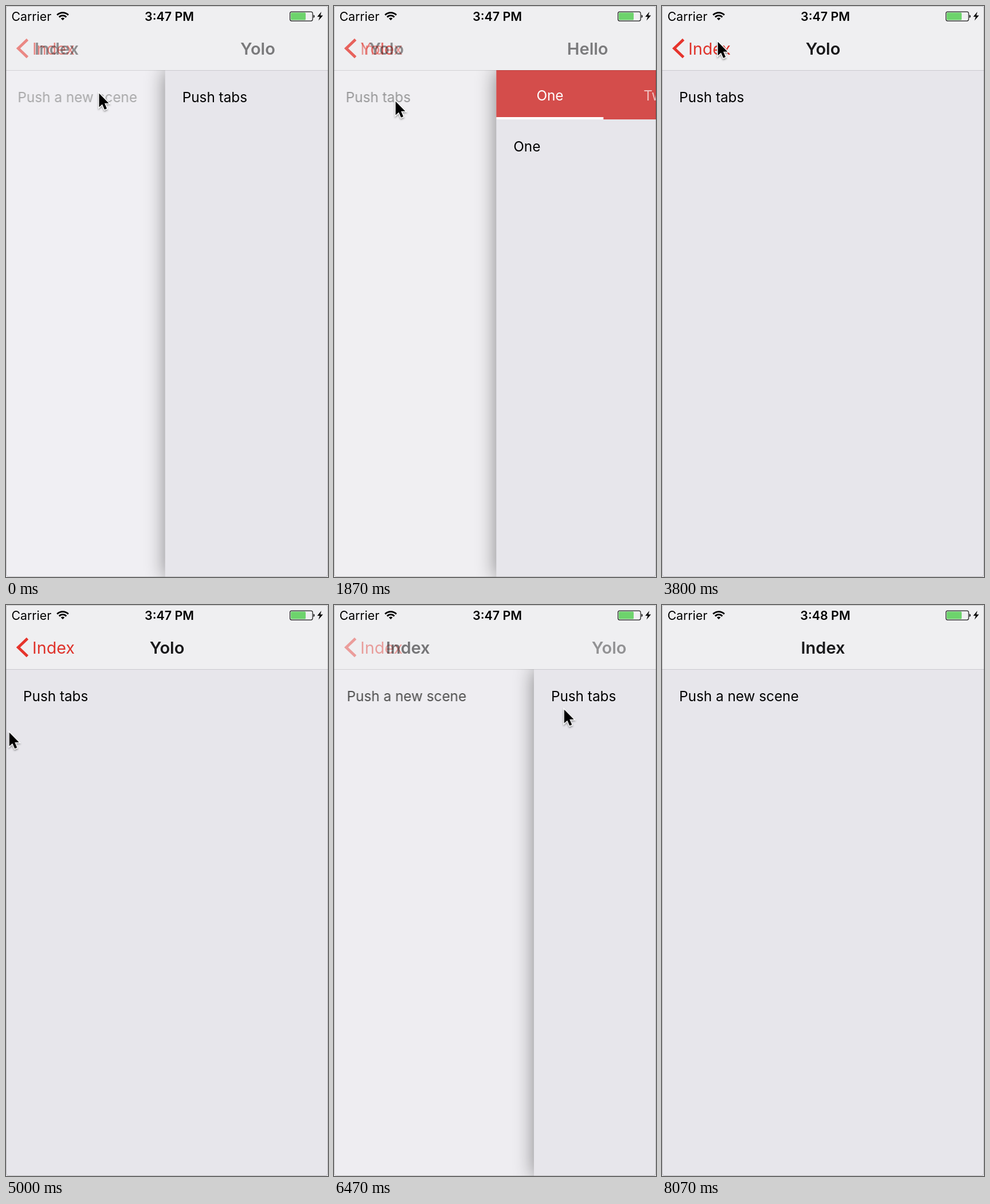
Write an HTML page that moves like this. It is 562 px wide and 997 px high and loops after 8140 ms.

```html
<!DOCTYPE html>
<html lang="en">
<head>
<meta charset="utf-8">
<title>Navigation demo</title>
<style>
/* --a: how far the Yolo card is off screen, --b: the same for the Hello card */
@property --a { syntax: "<number>"; inherits: true; initial-value: 1; }
@property --b { syntax: "<number>"; inherits: true; initial-value: 1; }

html, body { margin: 0; width: 100%; height: 100%; overflow: hidden; background: #fff; }

.stage {
  position: absolute; left: 0; top: 0; width: 562px; height: 997px;
  overflow: hidden; background: #fff; color: #000;
  font: 24.3px/40px Inter, "Open Sans", sans-serif;
  animation: slide-a 8140ms infinite linear, slide-b 8140ms infinite ease-in-out;
}
.stage * { position: absolute; box-sizing: border-box; white-space: nowrap; }
svg * { position: static; }

.cards { left: 0; top: 112px; width: 562px; height: 885px; overflow: hidden; }
.card {
  inset: 0; background: #e7e6eb;
  box-shadow: 0 0 32px rgba(0, 0, 0, .45);
}
.card > .text { left: 30px; top: 27px; }
.index.card {
  opacity: calc(.3 + .7 * var(--a) - .7 * (1 - var(--b)));
  transform: translateX(calc((var(--a) + var(--b) - 2) * 17.6px));
}
.yolo.card {
  opacity: calc(.3 + .7 * var(--b));
  transform: translateX(calc(var(--a) * 615px - (1 - var(--b)) * 17.6px));
}
.hello.card { transform: translateX(calc(var(--b) * 615px)); }
.hello.card > .text { top: 113px; }

.tabs { left: 0; top: 0; width: 100%; height: 86px; background: #d44d4b; color: #fff; }
.tabs span { top: 24px; width: 33.333%; text-align: center; opacity: .65; }
.tabs span:nth-child(1) { left: 0; opacity: 1; }
.tabs span:nth-child(2) { left: 33.333%; }
.tabs span:nth-child(3) { left: 66.667%; }
.tabs i { left: 0; bottom: 0; width: 187px; height: 4px; background: #fff; }

.bar { left: 0; top: 0; width: 562px; height: 112px; background: #efeff1; }
.line { left: 0; top: 112px; width: 562px; height: 1px; background: rgba(0, 0, 0, .12); }

.title {
  left: 0; top: 55px; width: 562px; text-align: center;
  font-size: 29px; font-weight: 600; color: #19191b;
}
.index.title { opacity: var(--a); transform: translateX(calc((var(--a) - 1) * 351px)); }
.yolo.title {
  opacity: calc((1 - var(--a)) * var(--b));
  transform: translateX(calc((var(--a) + var(--b) - 1) * 351px));
}
.hello.title { opacity: calc(1 - var(--b)); transform: translateX(calc(var(--b) * 351px)); }

.back { left: 0; top: 55px; width: 200px; height: 40px; font-size: 28.7px; color: #df332b; }
.back span { left: 46px; top: 0; }
.back svg { left: 16px; top: 0; width: 26px; height: 40px; }
.back path { fill: none; stroke: #e6342c; stroke-width: 4.8; }
.yolo.back { opacity: calc((1 - var(--a)) * var(--b)); }
.hello.back { opacity: calc(1 - var(--b)); }
.hit { inset: 0; }

.carrier { left: 9.5px; top: -2px; font-size: 21.3px; }
.clock { left: 0; top: -2px; width: 570px; text-align: center; font-size: 21.4px; font-weight: 600; }
.icons { left: 0; top: 0; width: 562px; height: 40px; }
.frame {
  inset: 0; border-radius: 3px 3px 5px 5px;
  box-shadow: inset 0 0 0 1px rgba(0, 0, 0, .19);
}
.cursor {
  left: 0; top: 0; width: 30px; height: 40px; overflow: visible;
  filter: drop-shadow(0 2px 1.5px rgba(0, 0, 0, .35));
  animation: point 8140ms infinite linear, leave 8140ms infinite step-end;
}

.first-tap { animation: first-tap 8140ms infinite linear; }
.tabs-tap { animation: tabs-tap 8140ms infinite linear; }
.back-tap { animation: back-tap 8140ms infinite linear; }
.before { animation: before 8140ms infinite step-end; }
.after { animation: after 8140ms infinite step-end; }

@keyframes slide-a {
  0% { --a: .458; animation-timing-function: ease-out; }
  1.47%, 61.9% { --a: 0; }
  67.94%, 70.39% { --a: .3; }
  74.57% { --a: .396; }
  79.48% { --a: .567; }
  81.08% { --a: .6; animation-timing-function: ease-out; }
  84.15%, 100% { --a: 1; }
}
@keyframes slide-b {
  0%, 21.38% { --b: 1; }
  24.45%, 42.75% { --b: 0; }
  45.82%, 100% { --b: 1; }
}
@keyframes first-tap {
  0% { opacity: .5; }
  1.6%, 100% { opacity: 1; }
}
@keyframes tabs-tap {
  0%, 19.66% { opacity: 1; }
  20.76%, 21.38% { opacity: .2; }
  24.45%, 100% { opacity: 1; }
}
@keyframes back-tap {
  0%, 41.15% { opacity: 1; }
  42.26%, 42.75% { opacity: .2; }
  45.82%, 100% { opacity: 1; }
}
@keyframes before {
  0% { visibility: visible; }
  86%, 100% { visibility: hidden; }
}
@keyframes after {
  0% { visibility: hidden; }
  86%, 100% { visibility: visible; }
}
@keyframes leave {
  0% { visibility: visible; }
  91.77%, 100% { visibility: hidden; }
}
@keyframes point {
  0% { transform: translate(162px, 152px); }
  2.46% { transform: translate(160px, 153px); animation-timing-function: ease-in-out; }
  10.7% { transform: translate(117px, 159px); }
  13.14% { transform: translate(112px, 162px); }
  17.2%, 24.57% { transform: translate(107px, 166px); }
  29.48% { transform: translate(104px, 128px); animation-timing-function: ease-out; }
  37.7%, 47% { transform: translate(97px, 62px); }
  50.74% { transform: translate(90px, 70px); animation-timing-function: ease-in-out; }
  57.37%, 61.43% { transform: translate(5px, 222px); }
  67.94%, 70.39% { transform: translate(231px, 217px); }
  74.57% { transform: translate(287px, 212px); }
  79.48% { transform: translate(401px, 182px); }
  81.08% { transform: translate(421px, 177px); animation-timing-function: ease-out; }
  90.9%, 100% { transform: translate(477px, 149px); }
}
</style>
</head>
<body>
<div class="stage">
  <div class="cards">
    <div class="index card"><span class="text first-tap">Push a new scene</span></div>
    <div class="yolo card"><span class="text tabs-tap">Push tabs</span></div>
    <div class="hello card">
      <div class="tabs"><span>One</span><span>Two</span><span>Three</span><i></i></div>
      <span class="text">One</span>
    </div>
  </div>

  <div class="bar"></div>
  <div class="line"></div>
  <div class="yolo back">
    <svg viewBox="0 0 26 40"><path d="M21.5 3.5 5.3 19 21.5 34.5"/></svg><span>Index</span>
  </div>
  <div class="hello back"><div class="hit back-tap">
    <svg viewBox="0 0 26 40"><path d="M21.5 3.5 5.3 19 21.5 34.5"/></svg><span>Yolo</span>
  </div></div>
  <div class="index title">Index</div>
  <div class="yolo title">Yolo</div>
  <div class="hello title">Hello</div>

  <span class="carrier">Carrier</span>
  <span class="clock before">3:47 PM</span>
  <span class="clock after">3:48 PM</span>
  <svg class="icons" viewBox="0 0 562 40">
    <g transform="translate(99 25)">
      <path d="M-9.8-9.2A13.5 13.5 0 0 1 9.8-9.2M-6.2-5.5A8.3 8.3 0 0 1 6.2-5.5" fill="none" stroke="#000" stroke-width="2.8"/>
      <path d="M0 0-3.2-3.2A4.5 4.5 0 0 1 3.2-3.2Z"/>
    </g>
    <rect x="495.6" y="10.1" width="39.6" height="16" rx="3" fill="none" stroke="#1a1a1a" stroke-width="1.2"/>
    <rect x="497" y="11.6" width="26" height="13" rx="1.5" fill="#6dd36c"/>
    <path d="M536.6 15.2Q538.6 15.8 538.6 18T536.6 21Z"/>
    <path d="M550.5 10 543.2 18.8H547.6L545.4 25.5 553.2 16.4H548.6Z"/>
  </svg>
  <div class="frame"></div>

  <svg class="cursor" viewBox="0 0 30 40">
    <path d="M.5.5V24.5L6 19.4 10 28.8 14 27.1 10 17.8H17.4Z" stroke="#fff" stroke-width="3" paint-order="stroke"/>
  </svg>
</div>
</body>
</html>
```
